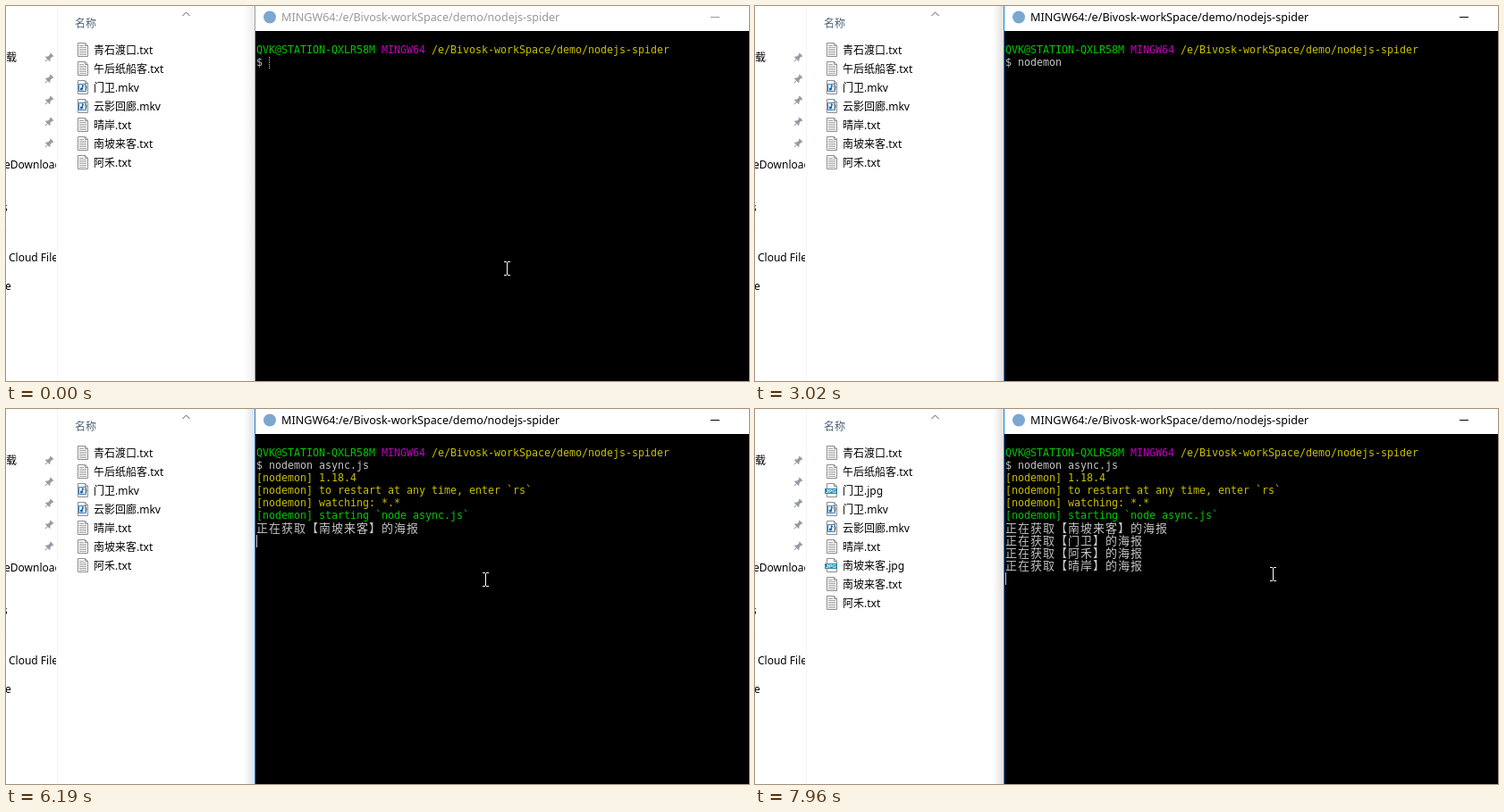
Write an HTML page that moves like this. It is 831x420 px and loops after 8 s.

```html
<!DOCTYPE html>
<html lang="zh-CN">
<head>
<meta charset="utf-8">
<title>Poster spider</title>
<style>
html, body { margin: 0; width: 100%; height: 100%; overflow: hidden; background: #fff; }
svg { display: block; }
text { white-space: pre; font: 12px "Noto Sans", "Noto Sans CJK SC", sans-serif; }
.title { font-size: 12.6px; }
.mono text { font: 11.63px "DejaVu Sans Mono", monospace; }
.mono .cjk { font: 13px "Noto Sans CJK SC", sans-serif; letter-spacing: 1px; }
.jpg { font: bold 6px "Liberation Sans", sans-serif; }
.green { fill: #00c800; }
.magenta { fill: #bf00bf; }
.yellow { fill: #c8c000; }
.white, .cjk { fill: #c4c4c4; }
</style>
</head>
<body>
<svg width="831" height="420" viewBox="0 0 831 420">
  <defs>
    <linearGradient id="shade">
      <stop offset="0" stop-color="#000" stop-opacity="0"/>
      <stop offset="1" stop-color="#000" stop-opacity=".12"/>
    </linearGradient>
    <clipPath id="side"><path d="M0 0H56V420H0z"/></clipPath>
    <g id="page">
      <path d="M1.5.5h8l3 3v12h-11z" fill="#fff" stroke="#8c8c8c"/>
      <path d="M9.5.5v3h3" fill="none" stroke="#8c8c8c"/>
    </g>
    <g id="txt">
      <use href="#page"/>
      <path d="M3 3.5h5M3 5.5h8M3 7.5h8M3 9.5h8M3 11.5h8M3 13.5h8" stroke="#a3a3a3"/>
    </g>
    <g id="mkv">
      <use href="#page"/>
      <path d="M2.500 4.500h8v8h-8z" fill="#d9eaf8" stroke="#3f82c0"/>
      <path d="M6.500 10V5.500l2 2" fill="none" stroke="#1f5f9f"/>
      <circle cx="5.400" cy="10" r="1.500" fill="#1f5f9f"/>
      <path d="M10 6q2 2 0 5" fill="none" stroke="#3c3c3c"/>
    </g>
    <g id="jpg">
      <use href="#page"/>
      <path d="M-1 6h14v6H-1z" fill="#2a8ca8"/>
      <text class="jpg" x="0" y="11.200" fill="#fff">JPG</text>
    </g>
    <path id="pin" transform="rotate(45) scale(.85)" fill="#949ba3"
      d="M-3-6h6v1.500h-1v4l2 2v1.200h-8V1.500l2-2v-4h-1zM-.6 2.500h1.200V7h-1.200z"/>
  </defs>

  <g clip-path="url(#side)">
    <text x="0" y="62">载</text>
    <text x="-2" y="182">eDownload</text>
    <text x="-4" y="230">s</text>
    <text x="-5" y="254" fill="#1e90d8">s</text>
    <text x="3" y="286">Cloud File</text>
    <text x="-1" y="318">e</text>
    <g id="pins"></g>
  </g>
  <path d="M57.500 0V420" stroke="#f5f5f5"/>
  <text x="77" y="24" fill="#4c607a">名称</text>
  <path d="M197.500 11l4-4 4 4" fill="none" stroke="#555"/>
  <g id="files"></g>

  <rect id="shadow" x="266" width="12" height="420" fill="url(#shade)"/>
  <path d="M278 0H831V28H278z" fill="#fff"/>
  <path d="M279 28H831V420H279z"/>
  <path id="edge" d="M278.500 0V420"/>
  <circle cx="295" cy="12.500" r="7" fill="#7ba7d0"/>
  <g id="caption">
    <text class="title" x="308" y="17">MINGW64:/e/Bivosk-workSpace/demo/nodejs-spider</text>
    <path d="M788 12h10v1h-10z"/>
  </g>
  <g class="mono">
    <text x="280" y="53"><tspan class="green">QVK@STATION-QXLR58M</tspan> <tspan class="magenta">MINGW64</tspan> <tspan class="yellow">/e/Bivosk-workSpace/demo/nodejs-spider</tspan></text>
    <text id="command" class="white" x="280" y="67"></text>
    <g id="output"></g>
  </g>
  <path id="caret" d="M.5 0v14" stroke="#d0d0d0"/>
  <path id="mouse" d="M-3-7.500h3M1-7.500h3M-3 7.500h3M1 7.500h3M.5-7V7" fill="none" stroke="#fff"/>
</svg>
<script>
const LOOP = 8000, ENTER = 4630;
const $ = id => document.getElementById(id);
const show = (el, on) => el.setAttribute("visibility", on ? "visible" : "hidden");
const place = (el, x, y) => el.setAttribute("transform", `translate(${x} ${y})`);
const latest = (keys, t) => keys.filter(k => k[0] <= t).pop();

const command = "nodemon async.js ";
const typed = [[0, 0], [990, 2], [1140, 3], [1310, 4], [2240, 5], [2470, 8],
  [3480, 9], [3710, 10], [3940, 11], [4170, 17]];
const caretOff = [[670, 990], [3020, 3480], [5180, 5560], [6880, 7200], [7730, 7960]];

const fetching = name => `正在获取【${name}】的海报`;
const output = [
  [5560, "yellow", "[nodemon] 1.18.4"],
  [5560, "yellow", "[nodemon] to restart at any time, enter `rs`"],
  [5560, "yellow", "[nodemon] watching: *.*"],
  [5630, "green", "[nodemon] starting `node async.js`"],
  [6190, "cjk", fetching("南坡来客")],
  [6340, "cjk", fetching("门卫")],
  [7200, "cjk", fetching("阿禾")],
  [7960, "cjk", fetching("晴岸")]
];

// Posters join the list once downloaded.
const POSTERS = 7410;
const files = ["青石渡口.txt", "午后纸船客.txt", "门卫.jpg", "门卫.mkv", "云影回廊.mkv",
  "晴岸.txt", "南坡来客.jpg", "南坡来客.txt", "阿禾.txt"];

// Pointer paths: start, end, number of steps, from point, to point.
const moves = [
  [70, 210, 3, 560, 294, 505, 232],
  [5560, 6020, 7, 505, 232, 531, 193],
  [6190, 6420, 4, 536, 191, 579, 185]
];

function pointer(t) {
  const move = latest(moves, t);
  if (!move) return [560, 294];
  const [start, end, steps, x0, y0, x1, y1] = move;
  const p = Math.min(1, Math.floor((t - start) / (end - start) * (steps - 1) + .05) / (steps - 1));
  return [Math.round(x0 + (x1 - x0) * p), Math.round(y0 + (y1 - y0) * p)];
}

function fileRow(name, i) {
  const y = 49 + 21 * i;
  return `<use href="#${name.split(".")[1]}" x="79" y="${y - 8}"/><text x="98" y="${y + 5}">${name}</text>`;
}

$("pins").innerHTML = [58, 82, 106, 130, 154]
  .map(y => `<use href="#pin" transform="translate(48 ${y})"/>`).join("");
$("output").innerHTML = output
  .map(([, color, line], i) => `<text class="${color}" x="280" y="${81 + 14 * i + (color == "cjk")}">${line}</text>`).join("");
const lines = [...$("output").children];
let hasPosters;

function draw() {
  const t = performance.now() % LOOP;
  const active = t >= 70;
  $("edge").setAttribute("stroke", active ? "#1883d7" : "#a0a0a0");
  $("caption").setAttribute("fill", active ? "#000" : "#999");
  $("shadow").setAttribute("opacity", active ? 1 : .6);

  const count = latest(typed, t)[1];
  $("command").textContent = "$ " + command.slice(0, count);
  lines.forEach((el, i) => show(el, t >= output[i][0]));
  const printed = output.filter(line => line[0] <= t).length;
  if (t < ENTER) place($("caret"), 294 + 7 * count, 57);
  else place($("caret"), 280, 71 + 14 * printed);
  $("caret").setAttribute("stroke-dasharray", active ? "none" : "1 1");
  show($("caret"), !caretOff.some(([from, to]) => t >= from && t < to));

  place($("mouse"), ...pointer(t));
  show($("mouse"), t < 990 || t >= 5560);

  const posters = t >= POSTERS;
  if (posters !== hasPosters) {
    hasPosters = posters;
    $("files").innerHTML = files.filter(f => posters || !f.endsWith(".jpg")).map(fileRow).join("");
  }
  requestAnimationFrame(draw);
}
draw();
</script>
</body>
</html>
```
